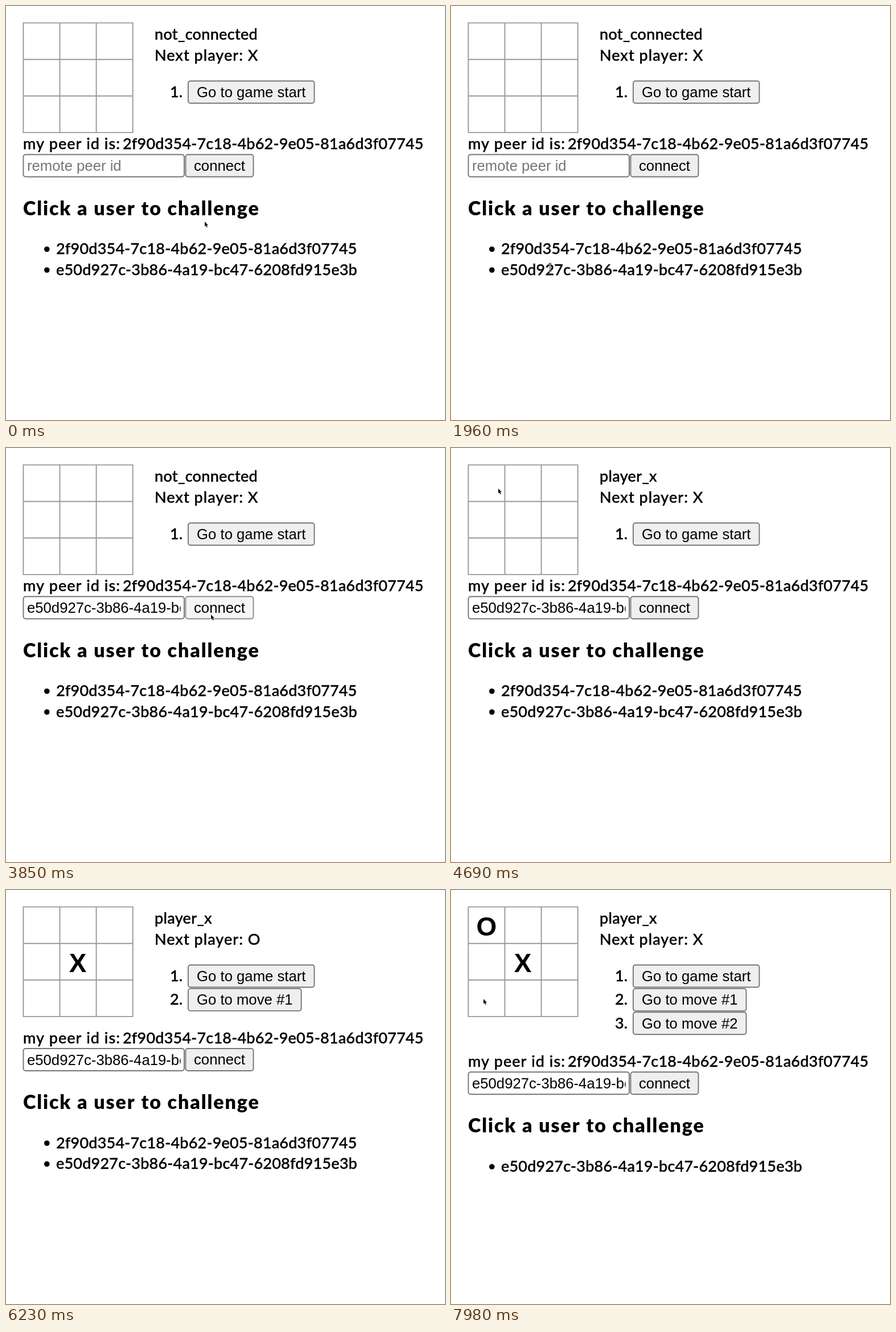
Animation, 771 px wide and 726 px high, one loop 8 s. Source, as an HTML page with a canvas:

```html
<!DOCTYPE html>
<html lang="en">
<head>
<meta charset="utf-8">
<title>Peer tic-tac-toe</title>
<style>
html, body { margin: 0; width: 100%; height: 100%; overflow: hidden; background: #fff; }
canvas { display: block; width: 771px; height: 726px; }
</style>
</head>
<body>
<canvas id="stage" width="771" height="726"></canvas>
<script>
const ctx = document.getElementById('stage').getContext('2d');
const LOOP = 8000, STEP = 70;
const MY_ID = '2f90d354-7c18-4b62-9e05-81a6d3f07745';
const PEER_ID = 'e50d927c-3b86-4a19-bc47-6208fd915e3b';
const BODY = '500 27px Lato, sans-serif';
const HEADING = '900 34px Lato, sans-serif';
const CONTROL = '25.7px "Liberation Sans", Arial, sans-serif';
const MARK = 'bold 46px "Liberation Sans", Arial, sans-serif';

const PRESS = 3780, CONNECTED = 3920, FILLED = 2940;
const MOVE_X = 5320, MOVE_O = 6860, PEER_LIST_CHANGE = 7560;

// Pointer positions: time, x, y
const PATH = [
  [0, 349, 378], [840, 349, 378], [1610, 215, 440], [1960, 174, 458],
  [2240, 140, 462], [2520, 139, 462], [2800, 135, 462], [2940, 135, 462],
  [3710, 360, 292], [4130, 360, 292], [4690, 83, 71], [4900, 80, 72],
  [5180, 128, 110], [5600, 128, 110], [5810, 740, 250],
  [7210, 755, 270], [7980, 57, 191], [8000, 57, 191]
];

function pointerAt(t) {
  const i = PATH.findIndex(p => p[0] > t);
  const [t0, x0, y0] = PATH[i - 1], [t1, x1, y1] = PATH[i];
  const u = (t - t0) / (t1 - t0), e = u * u * (3 - 2 * u);
  return [x0 + (x1 - x0) * e, y0 + (y1 - y0) * e];
}

function text(str, x, y, font, { color = '#000', spacing = 0, align = 'left', weight = 0 } = {}) {
  ctx.font = font;
  ctx.letterSpacing = spacing + 'px';
  ctx.textAlign = align;
  ctx.fillStyle = ctx.strokeStyle = color;
  ctx.fillText(str, x, y);
  if (weight) {
    ctx.lineWidth = weight;
    ctx.strokeText(str, x, y);
  }
}

const label = (str, x, y, spacing = 1) => text(str, x, y, BODY, { spacing, weight: 0.4 });
const idText = (str, x, y) => label(str, x, y, 0.2);

function box(x, y, w, h, fill, border) {
  ctx.beginPath();
  ctx.roundRect(x + 1, y + 1, w - 2, h - 2, 4);
  ctx.fillStyle = fill;
  ctx.fill();
  ctx.strokeStyle = border;
  ctx.lineWidth = 1.9;
  ctx.stroke();
}

function button(str, x, y, w, pressed) {
  box(x, y, w, 41, pressed ? '#f5f5f5' : '#efefef', pressed ? '#8d8d8d' : '#767676');
  text(str, x + w / 2, y + 29.3, CONTROL, { align: 'center' });
}

function board(t) {
  ctx.beginPath();
  for (let i = 0; i < 4; i++) {
    const x = 30.4 + i * 64.1, y = 29.6 + i * 64.1;
    ctx.moveTo(x, 28.7);
    ctx.lineTo(x, 222.8);
    ctx.moveTo(29.5, y);
    ctx.lineTo(223.6, y);
  }
  ctx.strokeStyle = '#999';
  ctx.lineWidth = 1.9;
  ctx.stroke();
  if (t >= MOVE_X) text('X', 126, 144, MARK, { align: 'center' });
  if (t >= MOVE_O) text('O', 62.5, 80, MARK, { align: 'center' });
}

function info(t) {
  label(t < CONNECTED ? 'not_connected' : 'player_x', 261, 59, 0.3);
  label('Next player: ' + (t >= MOVE_X && t < MOVE_O ? 'O' : 'X'), 261, 96);
  const moves = 1 + (t >= MOVE_X) + (t >= MOVE_O);
  for (let i = 0; i < moves; i++) {
    const y = 130.5 + i * 41.4;
    text(`${i + 1}.`, 310, y + 29.5, BODY, { align: 'right', weight: 0.4 });
    button(i ? `Go to move #${i}` : 'Go to game start', 319, y, i ? 200.5 : 223.5);
  }
}

function lobby(t) {
  ctx.save();
  ctx.translate(0, t < MOVE_X ? 0 : t < MOVE_O ? 17.5 : 58.8);
  label('my peer id is:', 30, 251);
  idText(MY_ID, 205, 251);

  box(29.5, 259.5, 284.5, 41, '#fff', '#767676');
  ctx.save();
  ctx.beginPath();
  ctx.rect(36, 262, 270.5, 36);
  ctx.clip();
  if (t < FILLED) text('remote peer id', 37, 289, CONTROL, { color: '#757575' });
  else text(PEER_ID, 37, 289, CONTROL);
  ctx.restore();
  button('connect', 314.5, 259.5, 121, t >= PRESS && t < CONNECTED);

  text('Click a user to challenge', 30, 366.5, HEADING, { spacing: 1.9 });
  const users = t < PEER_LIST_CHANGE ? [MY_ID, PEER_ID] : [PEER_ID];
  users.forEach((id, i) => {
    const y = 435 + i * 36.5;
    ctx.beginPath();
    ctx.arc(71.8, y - 8.5, 4.8, 0, 7);
    ctx.fillStyle = '#000';
    ctx.fill();
    idText(id, 88, y);
  });
  ctx.restore();
}

function arrow() {
  ctx.beginPath();
  [[0, 0], [0, 8.5], [1.9, 6.9], [3.4, 10.2], [4.9, 9.5], [3.5, 6.4], [6, 6.2]]
    .forEach(([x, y]) => ctx.lineTo(x, y));
  ctx.closePath();
  ctx.strokeStyle = '#fff';
  ctx.lineWidth = 1.6;
  ctx.stroke();
  ctx.fillStyle = '#111';
  ctx.fill();
}

function textBeam() {
  ctx.beginPath();
  ctx.moveTo(-2.5, -7);
  ctx.quadraticCurveTo(0, -7, 0, -5);
  ctx.quadraticCurveTo(0, -7, 2.5, -7);
  ctx.moveTo(0, -5);
  ctx.lineTo(0, 5);
  ctx.moveTo(-2.5, 7);
  ctx.quadraticCurveTo(0, 7, 0, 5);
  ctx.quadraticCurveTo(0, 7, 2.5, 7);
  for (const [color, width] of [['#fff', 2.6], ['#222', 1.2]]) {
    ctx.strokeStyle = color;
    ctx.lineWidth = width;
    ctx.stroke();
  }
}

function pointer(t) {
  if (t >= 5810 && t < 7210) return;
  const [x, y] = pointerAt(t);
  ctx.save();
  ctx.translate(x, y);
  if (y > 411 && x < 617) textBeam();
  else arrow();
  ctx.restore();
}

function draw(now) {
  const t = Math.floor((now % LOOP) / STEP) * STEP;
  ctx.fillStyle = '#fff';
  ctx.fillRect(0, 0, 771, 726);
  board(t);
  info(t);
  lobby(t);
  pointer(t);
}

let start;
function tick(now) {
  start ??= now;
  draw(Math.max(0, now - start));
  requestAnimationFrame(tick);
}
requestAnimationFrame(tick);
</script>
</body>
</html>
```
